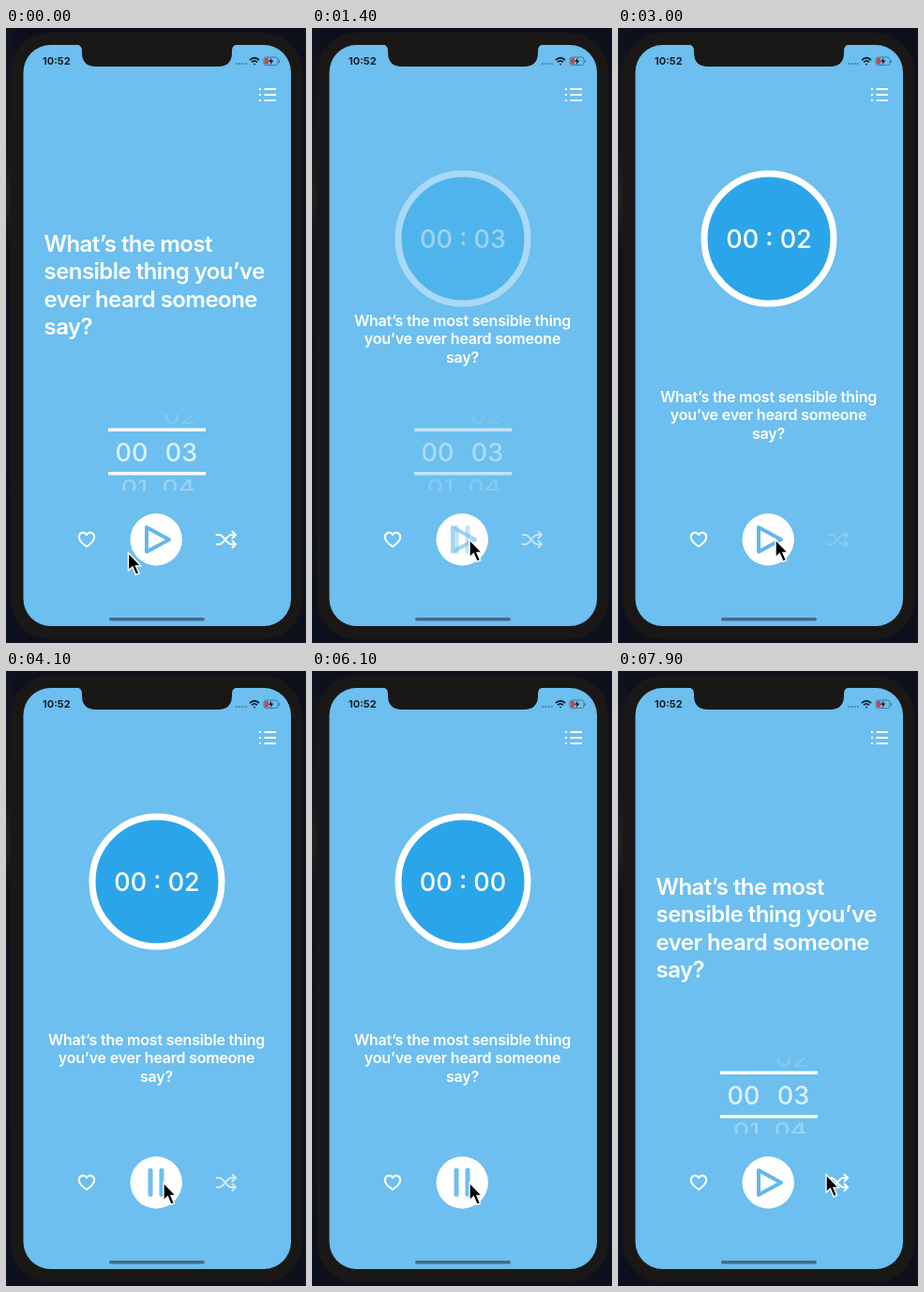
An HTML page for the animation above (8 s loop, 320 px wide and 654 px high).

```html
<!DOCTYPE html>
<html lang="en">
<head>
<meta charset="utf-8">
<title>Question timer</title>
<style>
  html, body { margin: 0; width: 100%; height: 100%; overflow: hidden; background: #0d101b; }
  svg { display: block; width: 320px; height: 654px; font-family: Inter, Roboto, sans-serif; }
  text { fill: #fff; white-space: pre; }
  .big { font-size: 24px; font-weight: 600; letter-spacing: -.54px; }
  .small { font-size: 16px; font-weight: 600; letter-spacing: -.2px; }
  .digits { font-size: 27px; font-weight: 500; }
  .mid { text-anchor: middle; }
  .line { fill: none; stroke: #fff; stroke-width: 2; stroke-linecap: round; stroke-linejoin: round; }
</style>
</head>
<body>
<svg viewBox="0 0 320 654">
  <defs>
    <linearGradient id="edge" x2="0" y2="1">
      <stop offset="0" stop-color="#10131f"/>
      <stop offset=".2" stop-color="#16171b"/>
      <stop offset=".28" stop-color="#202123"/>
      <stop offset=".36" stop-color="#11131a"/>
      <stop offset="1" stop-color="#0c1120"/>
    </linearGradient>
    <clipPath id="wheel"><rect x="105" y="411" width="112" height="81"/></clipPath>
  </defs>

  <!-- phone -->
  <rect width="320" height="654" fill="#0e111c"/>
  <rect width="8" height="654" fill="url(#edge)"/>
  <rect x="5" y="5" width="311" height="645" rx="42" fill="#191816"/>
  <rect x="18.5" y="18" width="285.5" height="618" rx="29" fill="#6cbfee"/>
  <path d="M75 17.5Q81 18 81 24V26Q81 41 96 41H226Q241 41 241 26V24Q241 18 247 17.5Z" fill="#191816"/>

  <!-- status bar -->
  <text x="39" y="39.3" style="font-size:11px;font-weight:700;fill:#14202a">10:52</text>
  <path d="M245 38H257" stroke="#4c8bb0" stroke-width="2" stroke-dasharray="2 1.3"/>
  <g fill="none" stroke="#10202c" stroke-width="1.7">
    <path d="M260 34Q265 29.5 270 34M262 36.3Q265 33.6 268 36.3"/>
    <path d="M264.2 38.5H265.8"/>
  </g>
  <rect x="275" y="31" width="15" height="8.5" rx="2.5" fill="none" stroke="#47799a"/>
  <rect x="276" y="32" width="4" height="6.5" rx="1" fill="#e23b3b"/>
  <path d="M283.5 31.5L280 36H282.5L281.5 39.5L285.5 34.5H283Z" fill="#10202c"/>
  <path d="M291.5 34V37" stroke="#47799a"/>
  <path d="M270 65H272M270 71H272M270 77H272M275.5 65H288M275.5 71H288M275.5 77H288" stroke="#fff" stroke-width="2"/>
  <rect x="110" y="627" width="102" height="3.6" rx="1.8" fill="#426c87"/>

  <!-- picker -->
  <g id="picker">
    <rect x="109" y="425.5" width="104" height="3.5" fill="#fff"/>
    <rect x="109" y="472" width="104" height="3.5" fill="#fff"/>
    <g class="digits mid" opacity=".75">
      <text x="134" y="460.5">00</text>
      <text x="187" y="460.5">03</text>
    </g>
    <g class="digits mid" clip-path="url(#wheel)">
      <g transform="translate(0 495) scale(1 .75)" opacity=".3">
        <text x="137">01</text>
        <text x="184">04</text>
      </g>
      <g transform="translate(0 421) scale(1 .75)" opacity=".14">
        <text x="185">02</text>
      </g>
    </g>
  </g>

  <!-- countdown -->
  <circle id="ring" cx="161" cy="224" r="69" fill="#2ba5ea" stroke="#fff" stroke-width="7"/>
  <text id="count" class="digits mid" x="161" y="233.7"></text>

  <!-- question -->
  <g id="big" class="big">
    <text x="40.5" y="237.6">What’s the most</text>
    <text x="40.5" y="267.2">sensible thing you’ve</text>
    <text x="40.5" y="296.8">ever heard someone</text>
    <text x="40.5" y="326.4">say?</text>
  </g>
  <g id="small" class="small mid">
    <text x="160.5" y="397.6">What’s the most sensible thing</text>
    <text x="160.5" y="417.2">you’ve ever heard someone</text>
    <text x="160.5" y="436.8">say?</text>
  </g>

  <!-- buttons -->
  <path class="line" d="M86 551.5C80 547.5 77.8 544.5 77.8 541.3C77.8 536.3 83.8 534.8 86 539C88.200 534.8 94.200 536.3 94.200 541.3C94.200 544.5 92 547.5 86 551.5Z"/>
  <g id="shuffle" class="line">
    <path d="M224.500 539H227.500C232.500 539 235 549 240.500 549H245M224.500 549H227.500C232.500 549 235 539 240.500 539H245"/>
    <path d="M241.500 535.5L245 539L241.500 542.5M241.500 545.5L245 549L241.500 552.5"/>
  </g>
  <circle cx="160.200" cy="544" r="27.700" fill="#fff"/>
  <path id="play" d="M150 531V557L174 544Z" fill="none" stroke="#64b7ea" stroke-width="4" stroke-linejoin="round"/>
  <path id="pause" d="M154 531V556.5M166 531V556.5" stroke="#6cbfee" stroke-width="5" stroke-linecap="round"/>

  <path id="cursor" d="M0 0V19L4.400 15L8 23.500L11.500 22L8 14H13.500Z" fill="#000" stroke="#fff" stroke-width="1.400"/>
</svg>
<script>
  const LOOP = 8000, STEP = 100, FADE = 350, SHIFT = 138;
  const START = 1245, HOLD = 2905, RESUME = 3965, END = 6965;
  const el = id => document.getElementById(id);
  const alpha = (id, v) => el(id).setAttribute('opacity', Math.max(0, v));
  const move = (id, x, y) => el(id).setAttribute('transform', `translate(${x} ${y})`);

  // smooth 0..1 progress
  function ease(t, from, span = FADE) {
    const k = Math.min(1, Math.max(0, (t - from) / span));
    return k * k * (3 - 2 * k);
  }

  function draw(t) {
    const opened = ease(t, START), closed = ease(t, END);
    const shown = opened - closed;
    const paused = ease(t, HOLD) - ease(t, RESUME);
    const running = t >= START && t < END;

    alpha('picker', 1 - shown);
    alpha('ring', opened - 1.28 * closed);
    alpha('count', shown);
    alpha('shuffle', 1 - shown + paused);

    const left = 3 - [2245, 4965, 5965].filter(tick => t >= tick).length;
    el('count').textContent = `00 : 0${left}`;

    alpha('big', running ? 0 : 1);
    alpha('small', running ? 1 : 0);
    move('big', 0, SHIFT * shown);
    move('small', 0, SHIFT * (shown - 1));

    const pauseIcon = t >= END || (t >= HOLD && t < RESUME) ? 0 : opened;
    alpha('pause', pauseIcon);
    alpha('play', 1 - pauseIcon);

    const a = ease(t, 50, 800), b = ease(t, 7600, 300);
    move('cursor', 130.5 + 37.5 * a + 54 * b, 558 - 14 * a - 8.5 * b);
  }

  const origin = performance.now();
  function frame() {
    const t = (performance.now() - origin) % LOOP;
    draw(Math.floor(t / STEP) * STEP);
    requestAnimationFrame(frame);
  }
  frame();
</script>
</body>
</html>
```
